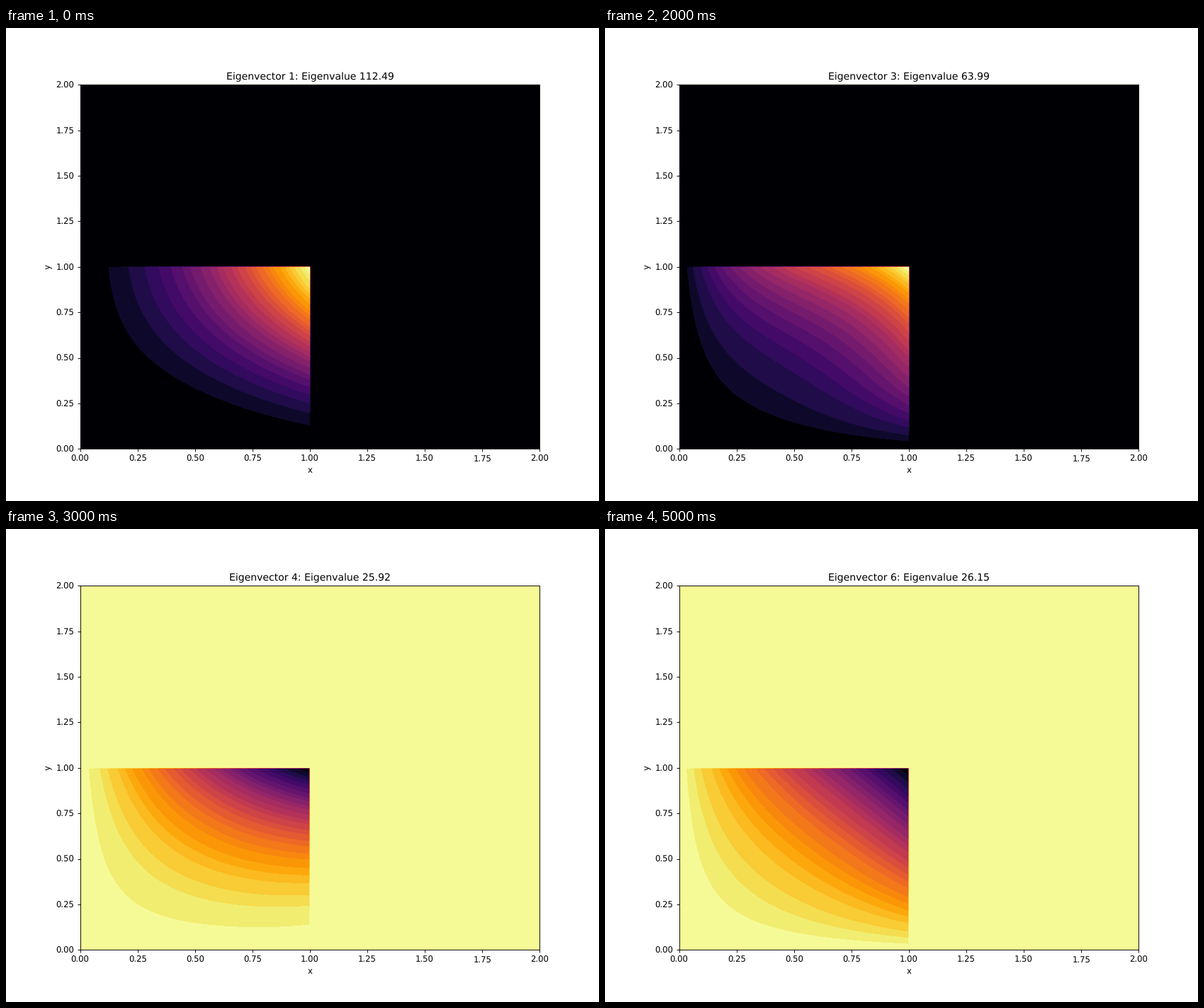
These frames come from a looping animation (837 px wide and 669 px high, 6 s). A matplotlib script:

```python
import numpy as np
import matplotlib.pyplot as plt
from matplotlib.animation import FuncAnimation
from matplotlib.colors import ListedColormap

W, H, DPI = 837, 669, 83.66
plt.rcParams["text.hinting"] = "none"

# Ritz basis x^p y^q by rising degree, fixed along x = 0 and y = 0
POWERS = [(p, d - p) for d in (2, 3, 4) for p in range(1, d)]

# Rank of each mode's eigenvalue and the sign of its x y^2 part
ORDER = [5, 0, 3, 1, 4, 2]
SIGNS = [1, -1, -1, 1, 1, -1]


def solve_modes():
    p, q = np.array(POWERS, float).T
    ps, qs = np.add.outer(p, p), np.add.outer(q, q)
    mass = 1 / ((ps + 1) * (qs + 1))
    stiff = (np.outer(p, p) / ((ps - 1) * (qs + 1))
             + np.outer(q, q) / ((ps + 1) * (qs - 1)))
    inv = np.linalg.inv(np.linalg.cholesky(mass))
    vals, vecs = np.linalg.eigh(inv @ stiff @ inv.T)
    vals, vecs = vals[ORDER], (inv.T @ vecs)[:, ORDER]
    vecs /= np.linalg.norm(vecs, axis=0)
    vecs *= SIGNS * np.sign(vecs[1])
    return vals, vecs


def stepped_inferno(n=26, power=0.9):
    """Inferno in flat steps that get finer towards the bright end."""
    step = np.floor(np.linspace(0, 1, 256) ** (1 / power) * n)
    mid = np.where((step > 0) & (step < n), step + 0.5, step)
    return ListedColormap(plt.get_cmap("inferno")((mid / n) ** power))


vals, vecs = solve_modes()
cmap = stepped_inferno()
axis = np.linspace(0, 2, 400)
X, Y = np.meshgrid(axis, axis)
inside = (X <= 1) & (Y <= 1)
basis = [X**p * Y**q for p, q in POWERS]

fig, ax = plt.subplots(figsize=((W + 0.01) / DPI, (H + 0.01) / DPI), dpi=DPI)


def draw(i):
    ax.clear()
    field = sum(c * b for c, b in zip(vecs[i], basis))
    ax.contourf(X, Y, np.where(inside, field, 0.0), levels=100, cmap=cmap)
    ax.set_title(f"Eigenvector {i + 1}: Eigenvalue {vals[i]:.2f}")
    ax.set_xlabel("x")
    ax.set_ylabel("y")
    return []


anim = FuncAnimation(fig, draw, frames=len(vals), interval=1000,
                     init_func=lambda: draw(0), repeat=True, repeat_delay=0)
plt.show()
```
